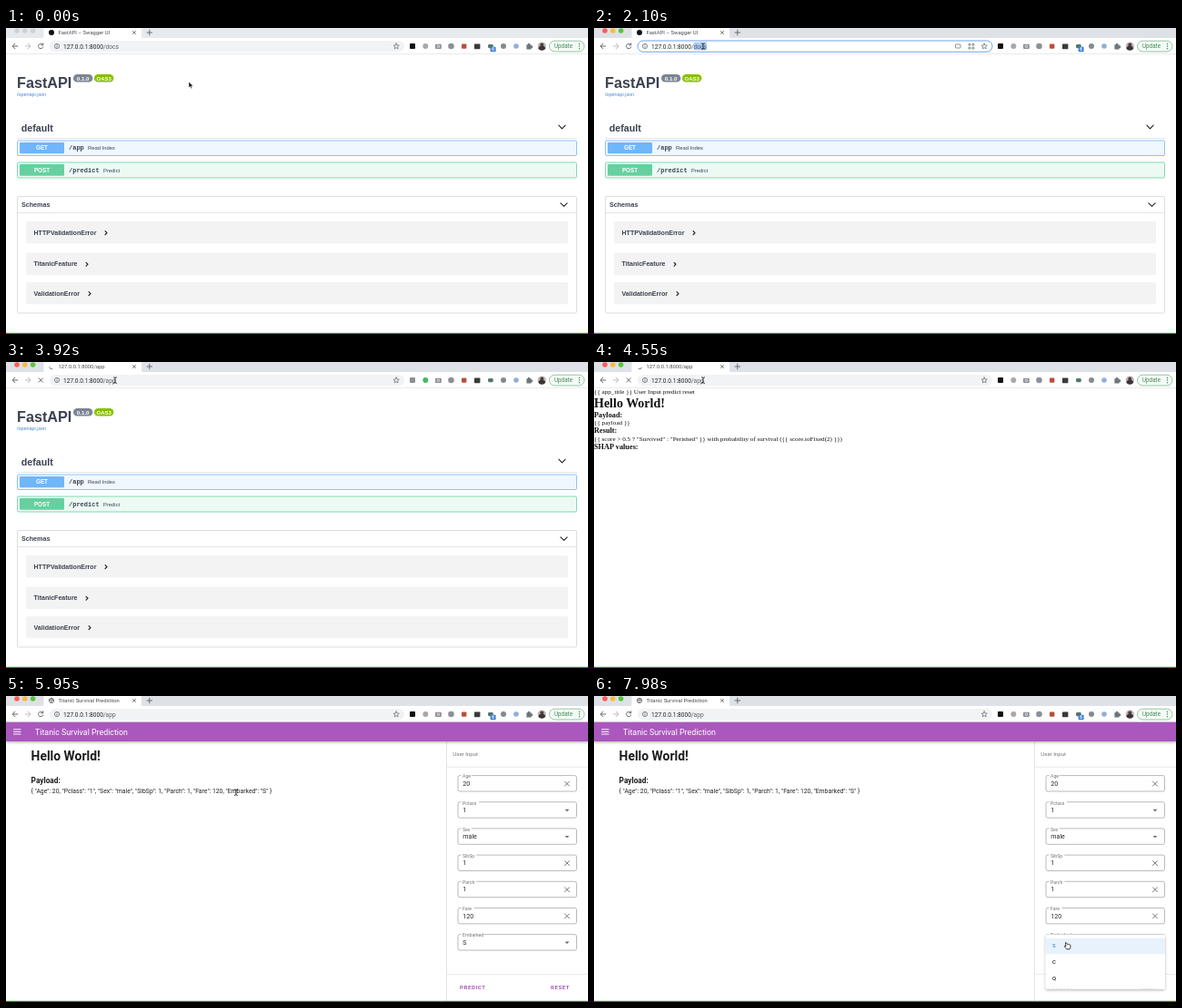
Animation of 640 by 337 pixels, one loop 8 s. Source, as an HTML page:

```html
<!DOCTYPE html>
<html lang="en">
<head>
<meta charset="utf-8">
<title>Browser demo</title>
<style>
html, body { margin: 0; width: 100%; height: 100%; overflow: hidden; background: #fff; }
svg { display: block; width: 640px; height: 337px; }
text { white-space: pre; }
.rb { font-family: Roboto, sans-serif; }
.ls { font-family: "Liberation Sans", Arial, sans-serif; fill: #3b4151; }
.mono { font-family: "Liberation Mono", monospace; font-weight: 700; fill: #3b4151; }
.se { font-family: "Liberation Serif", serif; fill: #111; }
.b { font-weight: 700; }
.m { font-weight: 500; }
.line { fill: none; stroke-linecap: round; stroke-linejoin: round; }
</style>
</head>
<body>
<svg id="stage" viewBox="0 0 640 337" xmlns="http://www.w3.org/2000/svg">
  <defs>
    <filter id="soft" x="-10%" y="-20%" width="120%" height="150%">
      <feDropShadow dx="0" dy="1.2" stdDeviation="1.6" flood-opacity=".3"/>
    </filter>
  </defs>
  <g id="docs"></g>
  <g id="raw"></g>
  <g id="app"></g>
  <g id="menu"></g>
  <g id="chrome"></g>
  <g id="drop"></g>
  <rect y="335.8" width="640" height="1.2" fill="#168a20"/>
  <g id="cursor"></g>
</svg>
<script>
const LOOP = 8000;
const $ = id => document.getElementById(id);
const esc = s => s.replace(/&/g, '&amp;').replace(/</g, '&lt;').replace(/>/g, '&gt;');

const text = (x, y, size, str, cls, fill = '', more = '') =>
  `<text x="${x}" y="${y}" font-size="${size}" class="${cls}" ${fill && `style="fill:${fill}"`} ${more}>${esc(str)}</text>`;
const rect = (x, y, w, h, fill, r = 0, more = '') =>
  `<rect x="${x}" y="${y}" width="${w}" height="${h}" fill="${fill}" rx="${r}" ${more}/>`;
const line = (d, color, w = 0.8) => `<path class="line" d="${d}" stroke="${color}" stroke-width="${w}"/>`;
const dot = (x, y, r, fill, more = '') => `<circle cx="${x}" cy="${y}" r="${r}" fill="${fill}" ${more}/>`;
const ring = (x, y, r, color, w = 0.8) => dot(x, y, r, 'none', `stroke="${color}" stroke-width="${w}"`);
const cross = (x, y, r, color, w) =>
  line(`M${x - r} ${y - r}L${x + r} ${y + r}M${x + r} ${y - r}L${x - r} ${y + r}`, color, w);
const globe = (x, y) => ring(x, y, 2.6, '#5f6368', 0.9) +
  line(`M${x - 2.4} ${y - 0.6}h2.2l.6 1.4l-1 1.4M${x + 0.4} ${y - 2.4}l-.3 1.2l1.6 .8`, '#5f6368', 0.9);

/* API documentation page */
function docsPage() {
  const chevron = (x, y) => line(`M${x - 3.6} ${y - 1.8}l3.6 3.6l3.6-3.6`, '#222', 1.1);
  const route = (y, h, color, bg, verb, path, x, note) =>
    rect(12.5, y, 615, h, bg, 1.5, `stroke="${color}" stroke-width=".8"`) +
    rect(15, y + 2, 49, h - 4.3, color, 1.2) +
    text(39.5, y + h / 2 + 2.1, 6.3, verb, 'ls b', '#fff', 'text-anchor="middle"') +
    text(69, y + h / 2 + 2.1, 7, path, 'mono') +
    text(x, y + h / 2 + 2, 5.85, note, 'ls');
  const model = (y, name, x) =>
    rect(22, y, 596, 24.3, '#f3f3f3', 1.5) + text(30.5, y + 14.5, 7.05, name, 'ls b') +
    line(`M${x - 0.9} ${y + 10.7}l1.9 1.9l-1.9 1.9`, '#222', 1.2);
  return rect(0, 28, 640, 309, '#fff') +
    text(12, 66, 16.2, 'FastAPI', 'ls b') +
    rect(74, 51, 21.3, 8.6, '#7d8492', 4.3) + text(77.8, 57.5, 6.2, '0.1.0', 'ls b', '#fff') +
    rect(97, 51, 21.3, 8.6, '#89bf04', 4.3) + text(99.6, 57.5, 6, 'OAS3', 'ls b', '#fff') +
    text(12, 75, 5.4, '/openapi.json', 'ls', '#4285d6') +
    text(16.7, 114, 10.7, 'default', 'ls b') + chevron(611.5, 109) +
    rect(12, 121, 616, 0.6, '#d5d7db') +
    route(124, 16.5, '#6fb6fb', '#eff7ff', 'GET', '/app', 90, 'Read Index') +
    route(148, 17, '#66d0a0', '#edfaf4', 'POST', '/predict', 107, 'Predict') +
    rect(12.5, 185.5, 615, 128.5, '#fff', 1.5, 'stroke="#d3d5d8" stroke-width=".8"') +
    text(17, 197.2, 7.15, 'Schemas', 'ls b') + chevron(613.5, 194.6) +
    rect(12.5, 203.2, 615, 0.7, '#d8dadd') +
    model(213, 'HTTPValidationError', 110) +
    model(247.6, 'TitanicFeature', 89) +
    model(280, 'ValidationError', 92);
}

/* Page before its template and styles run */
function rawPage() {
  const rows = [
    [35, 7.12, '{{ app_title }} User Input predict reset', ''],
    [49.5, 14, 'Hello World!', ' b'],
    [60.6, 8.3, 'Payload:', ' b'],
    [69, 7.12, '{{ payload }}', ''],
    [78.2, 8.3, 'Result:', ' b'],
    [86.6, 7.12, '{{ score > 0.5 ? "Survived" : "Perished" }} with probability of survival ({{ score.toFixed(2) }})', ''],
    [96, 8.3, 'SHAP values:', ' b']
  ];
  return rect(0, 28, 640, 309, '#fff') +
    rows.map(([y, size, str, cls]) => text(0, y, size, str, 'se' + cls)).join('');
}

/* Finished app */
const fields = [['Age', '20', 1], ['Pclass', '1', 0], ['Sex', 'male', 0], ['SibSp', '1', 1],
  ['Parch', '1', 1], ['Fare', '120', 1], ['Embarked', 'S', 0]];

function field([label, value, clear], i) {
  const y = 96.2 + i * 29.17;
  return rect(497, y - 8.6, 130.5, 17.4, '#fff', 2, 'stroke="#a9a9a9" stroke-width=".8"') +
    rect(500.5, y - 10, label.length * 2.75 + 3, 3, '#fff') +
    text(502, y - 5.8, 5.2, label, 'rb', '#757575') +
    text(502.3, y + 2.6, 7.1, value, 'rb', '#262626') +
    (clear ? cross(617, y + 0.4, 2.5, '#666', 0.9)
      : `<path d="M614.6 ${y - 0.6}h4.8l-2.4 2.4z" fill="#666"/>`);
}

function appPage() {
  const json = '{ "Age": 20, "Pclass": "1", "Sex": "male", "SibSp": 1, "Parch": 1, "Fare": 120, "Embarked": "S" }';
  return rect(0, 28, 640, 309, '#fff') +
    rect(484, 50, 0.8, 287, '#dedede') +
    rect(0, 28.5, 640, 21.5, '#aa59bd', 0, 'filter="url(#soft)"') +
    line('M8.5 36.8h7.5M8.5 39.4h7.5M8.5 42h7.5', '#fff', 0.95) +
    text(32, 42.6, 8.85, 'Titanic Survival Prediction', 'rb', '#fff') +
    text(27.6, 71, 13.9, 'Hello World!', 'rb b', '#1c1c1c') +
    text(27.6, 95.8, 8.3, 'Payload:', 'rb b', '#1c1c1c') +
    text(27.6, 107, 6.85, json, 'rb', '#222') +
    text(491.3, 66.4, 6.1, 'User Input', 'rb', '#757575') +
    rect(484.5, 77.8, 155.5, 0.7, '#e2e2e2') +
    fields.map(field).join('') +
    rect(484.5, 306, 155.5, 0.7, '#e2e2e2') +
    text(499, 323, 6.2, 'PREDICT', 'rb m', '#9440a8', 'letter-spacing=".55"') +
    text(599, 323, 6.2, 'RESET', 'rb m', '#9440a8', 'letter-spacing=".55"');
}

const menuList = () =>
  rect(496.5, 262.8, 131.5, 60, '#fff', 2, 'filter="url(#soft)"') +
  rect(496.5, 266.6, 131.5, 17.6, '#e8f2fc') +
  ['S', 'C', 'Q'].map((s, i) =>
    text(504, 277.3 + i * 17.6, 5.9, s, 'rb m', i ? '#222' : '#4a8fd6')).join('');

/* Browser frame */
function addressText(x, s) {
  const n = s.select || 0;
  const host = '127.0.0.1:8000', path = s.path;
  const cut = path.length - n;
  return `<text x="${x}" y="22.5" font-size="6.6" class="rb" style="fill:#5f6368"><tspan fill="#202124" style="fill:#202124">${host}</tspan>${path.slice(0, cut)}` +
    `<tspan id="sel">${path.slice(cut)}</tspan></text>`;
}

function extensions(s) {
  const gray = '#70757a', busy = s.fresh;
  return rect(444, 17, 6, 6, busy ? '#8b8f94' : '#111', 1) +
    dot(461.3, 20, 3, busy ? '#45b964' : '#a5a9ad') +
    rect(472, 17.7, 6.8, 5.2, '#8b8f94', 1) + ring(475.4, 20.3, 1.3, '#fff', 0.7) +
    dot(489.5, 20, 3.3, '#8d9196') +
    rect(501, 17.4, 5.4, 5.4, '#b94e3c', 1) +
    rect(515, 17.6, 6.4, 5.6, '#3a3a3a', 0.6) +
    rect(530, 18, 5.8, 4.2, '#53796d', 1.4) +
    (s.badge ? rect(532.6, 20.8, 6, 5.4, '#3b7fd9', 1) + text(534.2, 25.2, 4.5, '6', 'rb b', '#fff') : '') +
    dot(547, 20, 3, '#858a8f') +
    dot(561, 20, 2.8, '#8fb0d8') +
    `<path d="M572.4 18.2h1.6a1.1 1.1 0 1 1 2 0h1.7v1.6a1.1 1.1 0 1 1 0 2v1.6h-5.3z" fill="${gray}"/>` +
    dot(589.3, 20, 4.6, '#b9b6b8') +
    `<path d="M585.3 22.4a4.2 4.2 0 0 1 8 0a4.6 4.6 0 0 1-8 0z" fill="#3b3338"/>` + dot(589.3, 18.5, 1.9, '#4c3b38') +
    rect(597.5, 14.2, 38.5, 11.8, '#f5faf6', 5.9, 'stroke="#7bb98d" stroke-width=".8"') +
    text(603, 22.3, 6.3, 'Update', 'rb', '#3c8b55') +
    [17.4, 20.1, 22.8].map(y => dot(630.5, y, 0.75, '#3c8b55')).join('');
}

function chromeBar(s) {
  const lights = s.active ? ['#fb5f57', '#f5bd3f', '#59c240'] : ['#d0d1d3', '#d0d1d3', '#d0d1d3'];
  const icon = '#5f6368';
  const tabIcon = { dot: dot(50, 5, 3, '#111'), spin: '', globe: globe(50, 5) }[s.icon];
  return rect(0, 0, 640, 12, s.active ? '#dee1e6' : '#e7eaed') +
    rect(0, 11, 640, 17, '#fff') + rect(0, 28, 640, 0.6, '#dcdee1') +
    '<path d="M38 12q3.5 0 3.5-3.5V0H149v8.5q0 3.5 3.5 3.5z" fill="#fff"/>' +
    lights.map((c, i) => dot(12 + i * 8.8, 3, 2.8, c)).join('') +
    tabIcon + '<g id="spin"></g>' + text(57.5, 7.1, 5.85, s.title, 'rb', '#45494d') +
    cross(141, 5, 1.6, icon, 0.8) + line('M155 5h5.6M157.8 2.2v5.6', icon, 0.9) +
    line('M12.8 20H7.3M9.9 17.2L7.2 20l2.7 2.8', icon, 0.95) +
    line('M21.3 20h5.5M24.2 17.2l2.7 2.8l-2.7 2.8', '#b7babd', 0.95) +
    (s.loading ? cross(38.2, 20, 2.2, icon, 0.9)
      : line('M40.4 18.4A2.7 2.7 0 1 0 40.8 20.9M40.7 16.8v2h-2', icon, 0.95)) +
    rect(48, 14, 390, 12.3, s.focus ? '#fff' : '#f1f3f4', 6.1, s.focus ? 'stroke="#6fa3ec" stroke-width="1"' : '') +
    (s.list ? '' : ring(56, 20, 2.6, icon, 0.75) + line('M56 19.9v1.3M56 18.6v.1', icon, 0.75) +
      '<g id="mark"></g>' + addressText(63, s)) +
    (s.focus ? rect(397.5, 18, 5.5, 4, 'none', 0.5, `stroke="${icon}" stroke-width=".7"`) +
      line('M412.3 17.5h1.7v1.7h-1.7zM416.3 17.5h1.7v1.7h-1.7zM412.3 21.3h1.7v1.7h-1.7zM416.3 21.3h1.7v1.7h-1.7z', icon, 0.65) : '') +
    line('M429.2 16.9l.9 2.1l2.2.2l-1.7 1.5l.5 2.2l-1.9-1.2l-1.9 1.2l.5-2.2l-1.7-1.5l2.2-.2z', icon, 0.7) +
    extensions(s);
}

function dropList(s) {
  if (!s.list) return '';
  return rect(44, 11.5, 396, 52.5, '#fff', 3, 'filter="url(#soft)"') +
    rect(44, 28.3, 396, 15.8, '#dfe0e2') +
    globe(56, 20) + '<g id="mark"></g>' + addressText(68, s) +
    globe(56, 36) +
    '<text x="68" y="38.5" font-size="6.6" class="rb" fill="#333">Titanic Survival Prediction - ' +
    '<tspan fill="#2f67c4"><tspan class="b">127.0.0.1:8000/a</tspan>pp</tspan></text>' +
    cross(431, 36, 2, '#5f6368', 0.9) +
    ring(55.4, 51.4, 1.8, '#6b6f73', 0.8) + line('M56.8 52.8l1.8 1.8', '#6b6f73', 0.9) +
    '<text x="68" y="54.5" font-size="6.6" class="rb" fill="#333">127.0.0.1:8000/a<tspan fill="#777"> - Zuvila Search</tspan></text>';
}

/* Selection highlight follows the measured text */
function markSelection(s) {
  const sel = $('sel');
  if (!sel || !s.select) return;
  const host = sel.parentNode, len = host.getNumberOfChars();
  const a = host.getStartPositionOfChar(len - s.select).x;
  const b = host.getEndPositionOfChar(len - 1).x;
  $('mark').innerHTML = rect(a, 15.7, b - a, 8.7, '#a9cdf8');
}

const states = [
  { at: 0, page: 'docs', title: 'FastAPI – Swagger UI', icon: 'dot', path: '/docs', badge: 1 },
  { at: 1750, active: 1 },
  { at: 1890, focus: 1, select: 4 },
  { at: 2590, path: '/app', select: 2, list: 1 },
  { at: 3360, list: 0, focus: 0, select: 0, loading: 1, icon: 'spin', title: '127.0.0.1:8000/app' },
  { at: 3780, fresh: 1, badge: 0 },
  { at: 4270, page: 'raw' },
  { at: 4410, fresh: 0 },
  { at: 5180, loading: 0, icon: 'globe', title: 'Titanic Survival Prediction' },
  { at: 5530, page: 'app', badge: 1 }
];

/* Pointer stops: time, x, y, shape on the way there */
const stops = [
  [0, 201, 62, 'arrow'], [140, 201, 62, 'arrow'], [560, 122, 140, 'arrow'], [840, 104, 160, 'hand'],
  [1120, 104, 157, 'hand'], [1400, 98, 134, 'hand'], [1540, 98, 134, 'hand'], [1800, 120, 20, 'arrow'],
  [5390, 120, 20, 'beam'], [5880, 253, 106, 'beam'], [6370, 253, 106, 'beam'],
  [6930, 520, 274, 'arrow'], [8000, 520, 274, 'hand']
];

const shapes = {
  arrow: '<path d="M0-2.8v6.6l1.6-1.4l1.1 2.3l1.1-.5l-1.1-2.3h2.1z" fill="#111" stroke="#fff" stroke-width=".5"/>',
  beam: line('M-1.5-3.2q1.5 0 1.5 1q0-1 1.5-1M0-2.2v4.6M-1.5 3.4q1.5 0 1.5-1q0 1 1.5 1', '#222', 0.9),
  hand: '<path d="M-1.6-2.2q.8-.8 1.3.2l.6 1.4q1-.5 1.3.2q.8-.5 1.2.3q1-.2 1.1.7v2q0 1.2-.7 2.2h-3.4q-1-1.5-2.7-3q0-1 1.2-.5l.7.5z" fill="#fff" stroke="#111" stroke-width=".8" stroke-linejoin="round"/>'
};

const ease = u => u * u * (3 - 2 * u);

function pointer(t) {
  const i = Math.max(1, stops.findIndex(p => p[0] > t));
  const [t0, x0, y0] = stops[i - 1], [t1, x1, y1, shape] = stops[i];
  const u = ease((t - t0) / (t1 - t0));
  return { x: x0 + (x1 - x0) * u, y: y0 + (y1 - y0) * u, shape };
}

$('docs').innerHTML = docsPage();
$('raw').innerHTML = rawPage();
$('app').innerHTML = appPage();
$('menu').innerHTML = menuList();

let shown = -1;
function draw(t) {
  const last = states.filter(s => s.at <= t).length;
  if (last !== shown) {
    shown = last;
    const s = Object.assign({}, ...states.slice(0, last));
    for (const id of ['docs', 'raw', 'app']) $(id).style.display = s.page === id ? '' : 'none';
    $('chrome').innerHTML = chromeBar(s);
    $('drop').innerHTML = dropList(s);
    markSelection(s);
    if (s.icon === 'spin') $('spin').innerHTML = line('M50 2.4A2.6 2.6 0 0 1 52.6 5', '#777', 0.9);
  }
  $('spin').setAttribute('transform', `rotate(${t * 0.5 % 360} 50 5)`);
  const open = Math.min(1, Math.max(0, (t - 7490) / 280));
  const k = ease(open);
  $('menu').style.display = open ? '' : 'none';
  $('menu').setAttribute('opacity', k);
  $('menu').setAttribute('transform', `translate(496.5 262.8) scale(${0.6 + 0.4 * k}) translate(-496.5 -262.8)`);
  const p = pointer(t);
  $('cursor').setAttribute('transform', `translate(${p.x} ${p.y})`);
  $('cursor').innerHTML = shapes[p.shape];
}

const start = performance.now();
function tick() {
  draw((performance.now() - start) % LOOP);
  requestAnimationFrame(tick);
}
tick();
</script>
</body>
</html>
```
